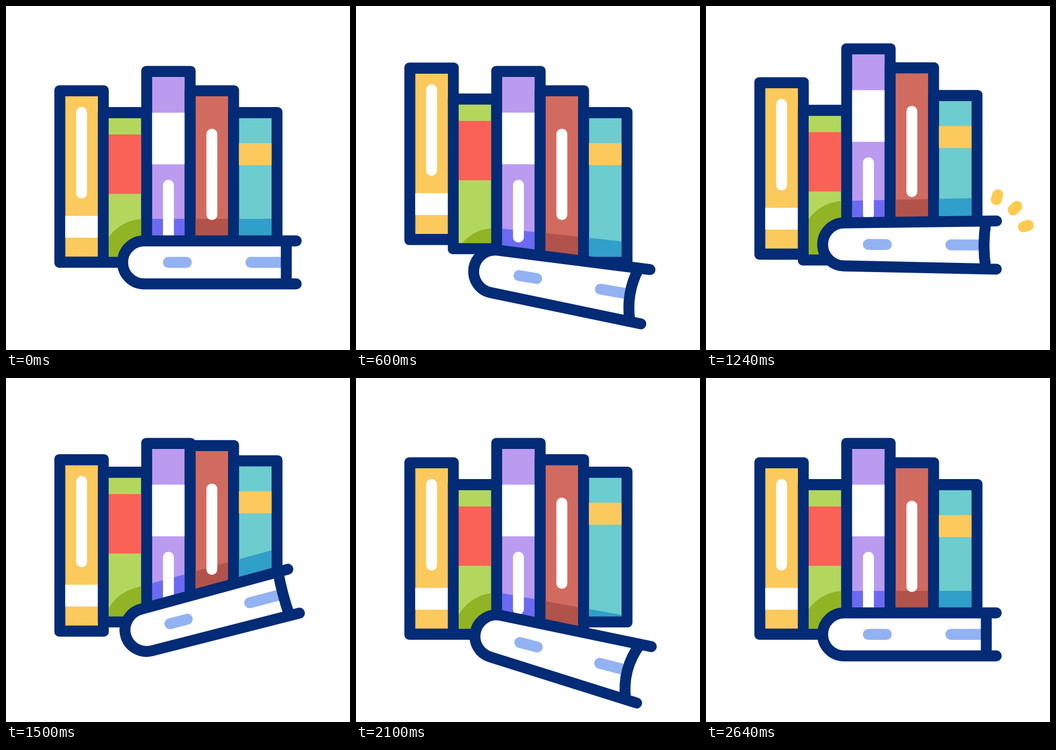
An HTML page with a canvas that plays this animation: 640x640 px, repeating every 3000 ms.

```html
<!DOCTYPE html>
<html lang="en">
<head>
<meta charset="utf-8">
<title>Books</title>
<style>
  html, body { margin: 0; width: 100%; height: 100%; overflow: hidden; background: #fff; }
  canvas { display: block; }
</style>
</head>
<body>
<canvas id="stage" width="640" height="640"></canvas>
<script>
const ctx = document.getElementById('stage').getContext('2d');
const LOOP = 3000, NAVY = '#032b76', YELLOW = '#fbc95c', WHITE = '#fff';
const BOTTOM = 487, STEP = 80.8, STAGGER = 200;

// band and label: [top, bottom]
const books = [
  { top: 147.5, fill: YELLOW, shade: YELLOW, bandFill: WHITE, band: [390.5, 431], label: [198, 348], peak: 50.5 },
  { top: 188, fill: '#b2d75c', shade: '#91b425', bandFill: '#fb6257', band: [239, 349.5] },
  { top: 111.5, fill: '#ba9bf0', shade: '#6c6af2', bandFill: WHITE, band: [198.5, 294.5], label: [333.5, 430] },
  { top: 147.5, fill: '#d26b5f', shade: '#b2534b', label: [238.5, 388] },
  { top: 188, fill: '#6dcccd', shade: '#309fc9', bandFill: YELLOW, band: [255, 296] }
];

const tilt = [[200, 0], [900, 15.5], [1600, -16.3], [2120, 14.7], [2620, 0]];
const drop = [[220, 0], [800, 53], [1390, -48], [2050, 38], [2620, 0]];
const gape = [[200, 0], [800, 3], [1440, 0.4], [2100, 2.85], [2620, 0]];
const jump = peak => [[190, 0], [560, 41.5], [782, peak], [1106, 0], [1345, 25], [1575, 0]];

// Sine easing between [time, value] keys
function ease(keys, t) {
  if (t <= keys[0][0]) return keys[0][1];
  for (let i = 1; i < keys.length; i++) {
    const [t0, a] = keys[i - 1], [t1, b] = keys[i];
    if (t < t1) return a + (b - a) * (1 - Math.cos(Math.PI * (t - t0) / (t1 - t0))) / 2;
  }
  return keys[keys.length - 1][1];
}

const ramp = (t, start, end) => Math.min(1, Math.max(0, (t - start) / (end - start)));
const rad = deg => deg * Math.PI / 180;

function line(color, x0, y0, x1, y1) {
  ctx.strokeStyle = color;
  ctx.beginPath();
  ctx.moveTo(x0, y0);
  ctx.lineTo(x1, y1);
  ctx.stroke();
}

// Points in the lying book's own space, with the spine centre at 0,0
function pose(t) {
  const open = rad(ease(gape, t)), c = Math.cos(open), s = Math.sin(open);
  const edge = (d, side) => [d * c - 40 * s, side * (d * s + 40 * c)];
  return { angle: rad(ease(tilt, t)), y: 477 + ease(drop, t), open, edge, bulge: 212 * open };
}

function enter(p) {
  ctx.translate(390, p.y);
  ctx.rotate(p.angle);
  ctx.translate(-133, 0);
}

function spineArc(r, open) {
  ctx.arc(0, 0, r, -Math.PI / 2 - open, Math.PI / 2 + open, true);
}

function castShadow(p, color) {
  const lean = p.open * 1.5, c = Math.cos(lean), s = Math.sin(lean);
  ctx.save();
  enter(p);
  ctx.beginPath();
  ctx.moveTo(300 * c - 81 * s, -300 * s - 81 * c);
  spineArc(81, lean);
  ctx.lineTo(300 * c - 81 * s, 300 * s + 81 * c);
  ctx.closePath();
  ctx.fillStyle = color;
  ctx.fill();
  ctx.restore();
}

function drawBook(book, i, t, p) {
  const x = 90 + STEP * i;
  const lift = ease(jump(book.peak || 45.5), t - STAGGER * i);
  const top = book.top - lift, bottom = BOTTOM - lift;

  ctx.fillStyle = NAVY;
  ctx.beginPath();
  ctx.roundRect(x, top, 101.2, bottom - top, 9);
  ctx.fill();

  ctx.save();
  ctx.beginPath();
  ctx.rect(x + 20.2, top + 20.5, 60.8, bottom - top - 41);
  ctx.clip();
  ctx.fillStyle = book.fill;
  ctx.fill();
  if (i) castShadow(p, book.shade);
  if (book.band) {
    ctx.fillStyle = book.bandFill;
    ctx.fillRect(x, book.band[0] - lift, 101, book.band[1] - book.band[0]);
  }
  if (book.label) {
    const [a, b] = book.label;
    line(WHITE, x + 50.6, a - lift, x + 50.6, b - lift);
  }
  ctx.restore();
}

function drawLyingBook(p) {
  const topPage = p.edge(264.5, -1), lowPage = p.edge(264.5, 1);
  const bend = [topPage[0] - 2 * p.bulge, 0];
  const reach = 283 + 60 * p.open;
  ctx.save();
  enter(p);

  ctx.fillStyle = WHITE;
  ctx.beginPath();
  ctx.moveTo(...topPage);
  spineArc(40, p.open);
  ctx.lineTo(...lowPage);
  ctx.quadraticCurveTo(...bend, ...topPage);
  ctx.fill();

  line('#93b2f2', 45, 0, 78.5, 0);
  line('#93b2f2', 198.5, 0, 257 - p.bulge, 0);

  ctx.strokeStyle = NAVY;
  ctx.beginPath();
  ctx.moveTo(...p.edge(reach, -1));
  spineArc(40, p.open);
  ctx.lineTo(...p.edge(reach, 1));
  ctx.moveTo(...topPage);
  ctx.quadraticCurveTo(...bend, ...lowPage);
  ctx.stroke();
  ctx.restore();
}

function drawSparks(t) {
  const head = 77 + 31 * ramp(t, 1160, 1420);
  const tail = 77 + 31 * ramp(t, 1240, 1500);
  if (head <= tail) return;
  for (const deg of [-72.6, -45, -17.4]) {
    const c = Math.cos(rad(deg)), s = Math.sin(rad(deg));
    line('#fecb4f', 517 + tail * c, 434 + tail * s, 517 + head * c, 434 + head * s);
  }
}

function draw(now) {
  const t = now % LOOP, p = pose(t);
  ctx.fillStyle = WHITE;
  ctx.fillRect(0, 0, 640, 640);
  ctx.lineWidth = 20.3;
  ctx.lineCap = ctx.lineJoin = 'round';
  books.forEach((book, i) => drawBook(book, i, t, p));
  drawLyingBook(p);
  drawSparks(t);
}

const start = performance.now();
function tick() {
  draw(performance.now() - start);
  requestAnimationFrame(tick);
}
tick();
</script>
</body>
</html>
```
